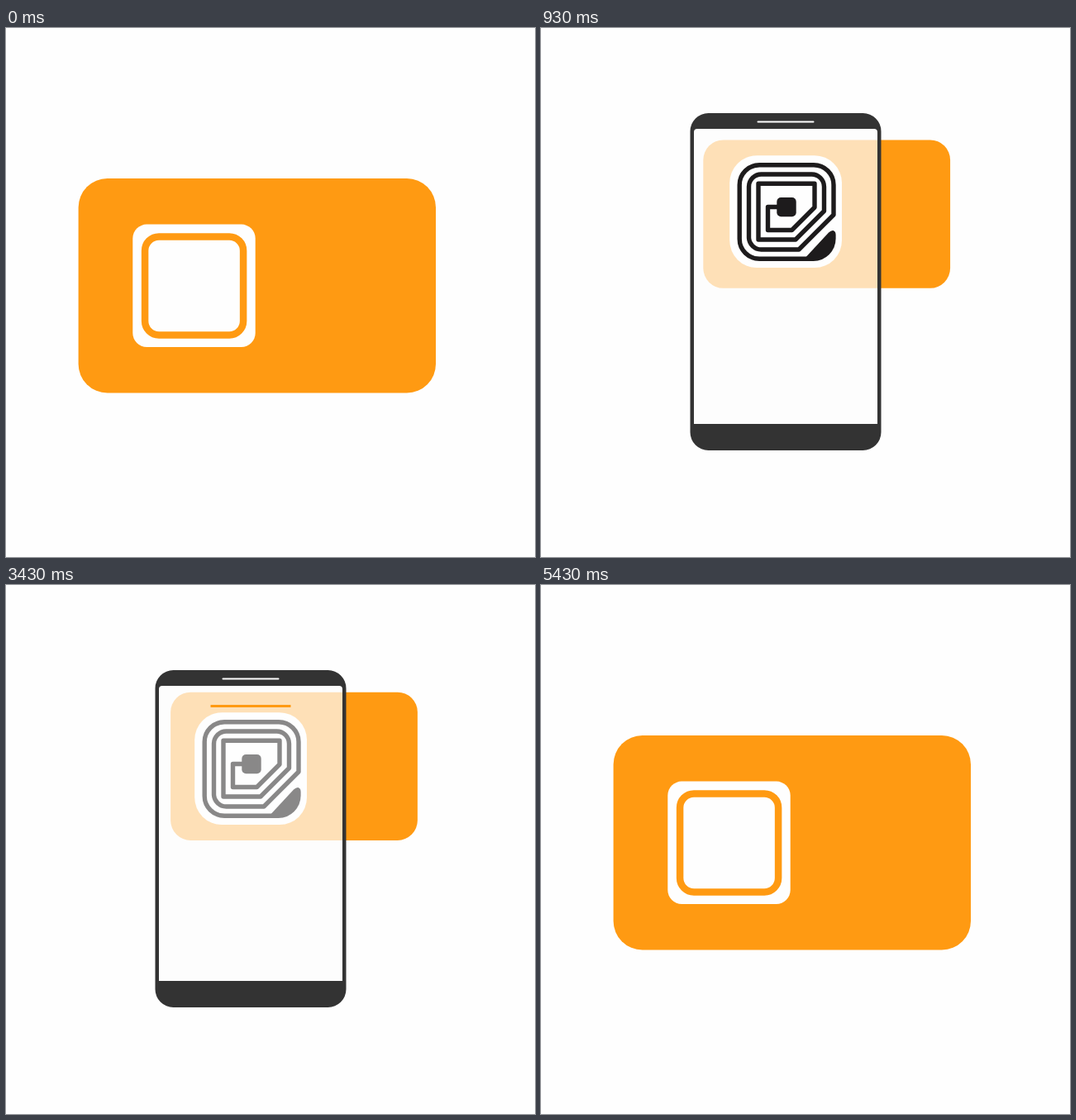
Write an HTML page that moves like this. It is 640x640 px and loops after 6.14 s.

```html
<!DOCTYPE html>
<html lang="en">
<head>
<meta charset="utf-8">
<title>Card scan</title>
<style>
  html, body { margin: 0; width: 100%; height: 100%; overflow: hidden; background: #fefefe; }
  svg { display: block; width: 100vw; height: 100vh; }
  .orange { fill: #ff9a12; }
  .white { fill: #fefefe; }
  .dark { fill: #333; }
  .ink { fill: #1d1b1c; }
</style>
</head>
<body>
<svg viewBox="0 0 640 640">
  <defs>
    <clipPath id="wipe"><rect id="wipeBox" x="251" y="180" width="0" height="80"/></clipPath>
  </defs>

  <!-- card, centred on its own origin -->
  <g id="card">
    <rect class="orange" x="-216.2" y="-129.7" width="432.4" height="259.4" rx="35"/>
    <rect class="white" x="-150.5" y="-74.2" width="148.4" height="148.4" rx="17"/>
    <rect x="-135.7" y="-59.4" width="119" height="119" rx="17" fill="none" stroke="#ff9a12" stroke-width="8.5"/>
  </g>

  <g id="phone">
    <rect x="184" y="121" width="224" height="359" fill="#fefefe" opacity=".7"/>
    <path class="dark" fill-rule="evenodd" d="M202.5 103H389.5A22 22 0 0 1 411.5 125V489A22 22 0 0 1 389.5 511H202.5A22 22 0 0 1 180.5 489V125A22 22 0 0 1 202.5 103Z
      M189 122A4 4 0 0 0 185 126V479H407V126A4 4 0 0 0 403 122Z"/>
    <path d="M262.5 113.5H329.5" stroke="#fefefe" stroke-width="2" stroke-linecap="round"/>
    <rect class="white" x="228.2" y="154.3" width="135.8" height="135.8" rx="33"/>

    <g id="tag">
      <path fill="none" stroke="#1d1b1c" stroke-width="5.4" stroke-linejoin="round" d="
        M322 279.3H264.2A24 24 0 0 1 240.2 255.3V189.7A24 24 0 0 1 264.2 165.7H330A24 24 0 0 1 354 189.7V226
        L312 268H266.5A15 15 0 0 1 251.5 253V192A15 15 0 0 1 266.5 177H327.5A15 15 0 0 1 342.5 192V221.5
        L308 256H263V188.3H331V217L303.5 244.5H274.5V216.5H290"/>
      <rect class="ink" x="285.3" y="205" width="23.4" height="23.2" rx="5"/>
      <path class="ink" d="M316 282L348 247.5Q351 244.6 353.5 245Q356.6 246 356.6 250V255A27 27 0 0 1 329.6 282Z"/>
    </g>

    <path class="orange" clip-path="url(#wipe)" stroke="#ff9a12" stroke-width="4" stroke-linejoin="round"
      d="M259 217L256.7 219.3L284.5 247.1L335.2 196.4L332.9 194.1L284.5 242.5Z"/>
    <rect id="line" class="orange" height="3"/>
  </g>
</svg>
<script>
  const LOOP = 6140, STEPS = 86, STEP = LOOP / STEPS;
  const [card, phone, tag, line, wipeBox] =
    ['card', 'phone', 'tag', 'line', 'wipeBox'].map(id => document.getElementById(id));

  // eased 0 to 1 between times a and b
  const ease = (t, a, b) => {
    const u = Math.min(1, Math.max(0, (t - a) / (b - a)));
    return u * u * (3 - 2 * u);
  };
  const mix = (a, b, p) => a + (b - a) * p;

  function draw(t) {
    const zoom = ease(t, 342, 823) - ease(t, 4795, 5325);
    const move = ease(t, 530, 1000) - ease(t, 4880, 5380);
    card.setAttribute('transform',
      `translate(${mix(303.8, 348.5, move)} ${mix(311.8, 219.3, move)}) scale(${mix(1, 0.691, zoom)})`);

    const x = -414 * (1 - ease(t, 90, 670)) - 420 * ease(t, 4321, 4735);
    phone.setAttribute('transform', `translate(${x} 0)`);

    tag.setAttribute('opacity', ease(t, 460, 760) - ease(t, 3290, 3570));
    wipeBox.setAttribute('width', 90 * ease(t, 3460, 3790));

    const width = 164 * (ease(t, 1050, 1700) - ease(t, 3143, 3790));
    const y = 294.5 - 146.5 * ease(t, 1714, 2143) + 143.5 * ease(t, 2214, 2642) - 146.5 * ease(t, 2714, 3143);
    line.setAttribute('x', 296 - width / 2);
    line.setAttribute('width', width);
    line.setAttribute('y', y);
  }

  // the motion runs at 14 steps per second
  const start = performance.now();
  function tick() {
    const t = performance.now() - start;
    draw(Math.floor((t + 2) / STEP) % STEPS * STEP);
    requestAnimationFrame(tick);
  }
  tick();
</script>
</body>
</html>
```
